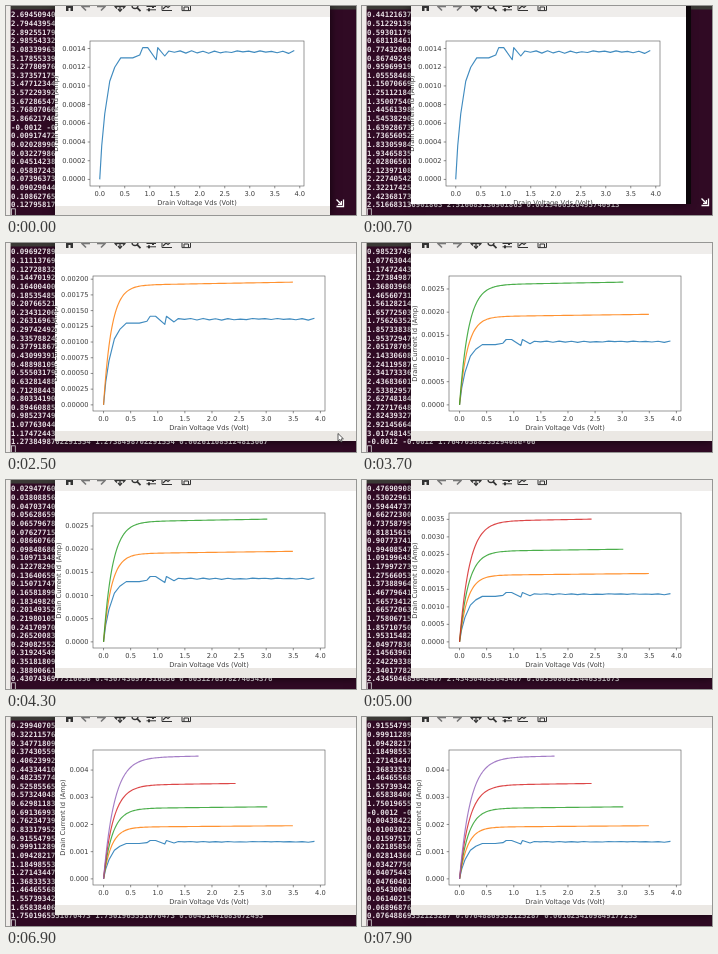
An HTML page with a canvas for the animation above (8 s loop, 350 by 209 pixels).

```html
<!DOCTYPE html>
<html lang="en">
<head>
<meta charset="utf-8">
<title>Transistor sweep</title>
<style>
html, body { margin: 0; width: 100%; height: 100%; overflow: hidden; background: #300a24; }
canvas { display: block; width: 350px; height: 209px; }
</style>
</head>
<body>
<canvas id="stage"></canvas>
<script>
const canvas = document.getElementById('stage');
const ctx = canvas.getContext('2d');
const dpr = window.devicePixelRatio || 1;
canvas.width = 350 * dpr;
canvas.height = 209 * dpr;

const LOOP = 8000;
const WIN_X = 49;
const ROWS = 23;
const READINGS = 50;       // per sweep
const SUPPLY = 4.82;       // volts at the end of a sweep
const RESISTOR = .68;      // kilo-ohms in series with the transistor
const MAX_VOLTS = 3.89;

// Saturation current in mA, and when the sweep prints its readings
const SWEEPS = [
  { sat: 1.36, from: -2000, to: -500, color: '#1f77b4' },
  { sat: 1.9, from: -220, to: 1030, color: '#ff7f0e' },
  { sat: 2.585, from: 1560, to: 3200, color: '#2ca02c' },
  { sat: 3.44, from: 3680, to: 5000, color: '#d62728' },
  { sat: 4.45, from: 5700, to: 6900, color: '#9467bd' },
  { sat: 5.4, from: 7600, to: 8950 }
];

const random = seed => Math.abs(Math.sin(seed * 12.9898 + 1) * 43758.5453) % 1;
const mix = (a, b, p) => a + (b - a) * p;
const progress = (t, from, to) => Math.min(1, Math.max(0, (t - from) / (to - from)));

const current = (n, v) => SWEEPS[n].sat * (1 - Math.exp(-v / (.13 + .0175 * n))) * (1 + .008 * v);

// Drain voltage left over once the series resistor has taken its share
function drainVolts(n, supply) {
  let low = 0, high = supply;
  for (let i = 0; i < 50; i++) {
    const v = (low + high) / 2;
    if (v + RESISTOR * current(n, v) < supply) low = v; else high = v;
  }
  return low;
}

function smoothCurve(n) {
  const end = drainVolts(n, SUPPLY);
  return Array.from({ length: 101 }, (_, i) => end * (i / 100) ** 2).map(v => [v, current(n, v)]);
}

function noisyCurve() {
  const points = [[0, 0], [.04, .36], [.1, .7], [.2, 1.05], [.3, 1.2], [.42, 1.3], [.66, 1.3], [.8, 1.33],
    [.86, 1.41], [.96, 1.41], [1.13, 1.28], [1.16, 1.41], [1.3, 1.32]];
  for (let i = 0; i < 23; i++) {
    points.push([mix(1.38, MAX_VOLTS, i / 22), 1.365 + (i % 2 ? -.02 : .015) * random(i)]);
  }
  return points;
}
const curves = SWEEPS.slice(0, 5).map((_, n) => n ? smoothCurve(n) : noisyCurve());

const format = x => Math.abs(x) < 1e-4 ? x.toExponential().replace('e-', 'e-0') : String(x);

function reading(i) {
  const n = Math.floor(i / READINGS);
  const supply = SUPPLY * (i % READINGS) / (READINGS - 1);
  const base = drainVolts(n, supply);
  const v = base - .0012 + (random(i) - .5) * .008 * Math.min(1, base);
  return [v, v, (supply - v) / RESISTOR / 1000].map(format).join(' ');
}
const lines = Array.from({ length: READINGS * SWEEPS.length }, (_, i) => reading(i));

// Readings come a little slower towards the end of each sweep
const printed = t => Math.round(SWEEPS.reduce((sum, { from, to }) =>
  sum + READINGS * (1 - (1 - progress(t, from, to)) ** 1.2), 0));

function box(x, y, r, b, color) {
  ctx.fillStyle = color;
  ctx.fillRect(x, y, r - x, b - y);
}

function stroke(points, color, width) {
  ctx.beginPath();
  points.forEach(([x, y]) => ctx.lineTo(x, y));
  ctx.strokeStyle = color;
  ctx.lineWidth = width;
  ctx.stroke();
}

function label(text, x, y, align) {
  ctx.textAlign = align;
  ctx.fillText(text, x, y);
}

function terminal(t) {
  box(0, 0, 350, 209, '#300a24');
  box(0, 0, 350, 3.5, '#3b3a36');
  box(0, 0, 4.6, 209, '#eeebe8');
  ctx.font = 'bold 7.37px "DejaVu Sans Mono", monospace';
  ctx.textBaseline = 'alphabetic';
  ctx.fillStyle = '#e8e1e6';
  const first = printed(t) - ROWS;
  for (let row = 0; row < ROWS; row++) label(lines[first + row], 5, 11.3 + row * 8.64, 'left');
  ctx.strokeStyle = '#ddd';
  ctx.lineWidth = .8;
  ctx.strokeRect(5.5, 202.8, 3.8, 7);
}

function toolbar(right) {
  box(WIN_X, 0, right, 11, '#efedeb');
  const dark = '#333', grey = '#777';
  box(60, 0, 62.5, 5, dark);
  box(64.5, 0, 67, 5, dark);
  box(60, 0, 67, 2, dark);
  for (const [x, d] of [[80, 1], [95, -1]]) {
    stroke([[x, -3], [x - 4 * d, .5], [x, 4.5]], grey, 1.6);
    stroke([[x - 4 * d, .5], [x + 4 * d, .5]], grey, 1.6);
  }
  stroke([[109, .5], [119, .5]], dark, 1.3);
  stroke([[114, -4], [114, 5]], dark, 1.3);
  stroke([[112, 3], [114, 5.2], [116, 3]], dark, 1.3);
  stroke([[111, -1.5], [109, .5], [111, 2.5]], dark, 1.3);
  stroke([[117, -1.5], [119, .5], [117, 2.5]], dark, 1.3);
  ctx.beginPath();
  ctx.arc(129, -.5, 3, 0, 7);
  ctx.stroke();
  stroke([[131, 1.7], [134.5, 5.2]], dark, 1.7);
  stroke([[140.5, .5], [150, .5]], dark, 1);
  stroke([[140.5, 3.8], [150, 3.8]], dark, 1);
  box(146, -1, 148, 2, dark);
  box(142, 2.3, 144, 5.3, dark);
  stroke([[156, -4], [156, 4.5], [166, 4.5]], dark, 1);
  stroke([[157, 3], [160, 0], [162, 1.5], [166, -2]], dark, 1.2);
  stroke([[176, -3], [176, 4.6], [184.5, 4.6], [184.5, -3]], dark, 1);
  stroke([[178, 4.5], [178, 1], [182.5, 1], [182.5, 4.5]], dark, 1);
}

function plot(shown, l, t, r, b) {
  const top = Math.max(...shown.flat().map(([, a]) => a));
  const step = [.2, .25, .5, 1].find(s => top / s < 8);
  const digits = 3 + (String(step).split('.')[1] || '').length;
  const w = r - l, h = b - t;
  const px = v => l + w / 22 + v * w / 1.1 / MAX_VOLTS;
  const py = a => b - h / 22 - a * h / 1.1 / top;
  ctx.lineJoin = 'round';
  ctx.globalAlpha = .85;
  shown.forEach((curve, n) => stroke(curve.map(([v, a]) => [px(v), py(a)]), SWEEPS[n].color, 1.15));
  ctx.globalAlpha = 1;
  ctx.lineJoin = 'miter';
  ctx.strokeStyle = '#555';
  ctx.lineWidth = .6;
  ctx.strokeRect(l, t, w, h);

  ctx.font = '6.7px "DejaVu Sans", sans-serif';
  ctx.textBaseline = 'middle';
  ctx.fillStyle = '#3c3c3c';
  for (let v = 0; v <= 4; v += .5) {
    stroke([[px(v), b], [px(v), b + 2.3]], '#444', .6);
    label(v.toFixed(1), px(v), b + 7.8, 'center');
  }
  for (let k = 0; py(k * step) > t; k++) {
    const y = py(k * step);
    stroke([[l - 2.3, y], [l, y]], '#444', .6);
    label((k * step / 1000).toFixed(digits), l - 4.4, y + .3, 'right');
  }
  label('Drain Voltage Vds (Volt)', (l + r) / 2, b + 17, 'center');
  const tickWidth = ctx.measureText((0).toFixed(digits)).width;
  ctx.save();
  ctx.translate(l - 10.2 - tickWidth, (t + b) / 2);
  ctx.rotate(-Math.PI / 2);
  label('Drain Current Id (Amp)', 0, 0, 'center');
  ctx.restore();
}

function figureWindow(t) {
  const shown = curves.filter((_, n) => SWEEPS[n].to <= t);
  const small = shown.length === 1;
  const right = small ? 324 : 350;
  const figureEnd = small ? 200 : 188;
  const bottom = mix(209, 198, progress(t, 0, 400));
  ctx.save();
  ctx.shadowColor = 'rgba(0, 0, 0, .7)';
  ctx.shadowBlur = 9 * dpr;
  box(WIN_X, 0, right, bottom, '#ebe8e4');
  ctx.restore();
  if (small) box(right, 0, right + 5 * progress(t, 0, 600), bottom, '#0c060a');
  ctx.save();
  ctx.beginPath();
  ctx.rect(WIN_X, 0, right - WIN_X, bottom);
  ctx.clip();
  box(WIN_X, 0, right, figureEnd, '#fff');
  toolbar(right);
  if (small) plot(shown, 84, 35, 298, 180);
  else plot(shown, 87, 33, 319, 168);
  box(WIN_X, figureEnd, right, 209, '#ebe8e4');
  ctx.restore();
}

function pointer(t) {
  ctx.save();
  if (t < 1100) {
    const p = progress(t, 0, 600);
    ctx.translate(mix(334, 343, p), mix(197, 196, p));
    stroke([[-3.5, 3.5], [3.5, 3.5], [3.5, -3.5]], '#fff', 1.3);
    stroke([[-3.5, -3.5], [1.2, 1.2]], '#fff', 1.3);
    stroke([[-2, 1.4], [1.4, 1.4], [1.4, -2]], '#fff', 1.3);
  } else {
    const drift = progress(t, 1500, 2500), leave = progress(t, 2500, 3200);
    ctx.translate(343 - 11 * drift - 14 * leave, 192 - 1.5 * drift - 201 * leave);
    ctx.beginPath();
    [[0, 0], [0, 7.5], [1.8, 6], [3, 8.6], [4.2, 8], [3, 5.5], [5.4, 5.3]].forEach(p => ctx.lineTo(...p));
    ctx.closePath();
    ctx.fillStyle = '#fff';
    ctx.fill();
    ctx.strokeStyle = '#333';
    ctx.lineWidth = .8;
    ctx.stroke();
  }
  ctx.restore();
}

const start = performance.now();
function frame() {
  const elapsed = Math.max(0, performance.now() - start) % LOOP;
  const t = Math.floor(elapsed / 100) * 100;
  ctx.setTransform(dpr, 0, 0, dpr, 0, 0);
  terminal(t);
  figureWindow(t);
  pointer(t);
  requestAnimationFrame(frame);
}
frame();
</script>
</body>
</html>
```
